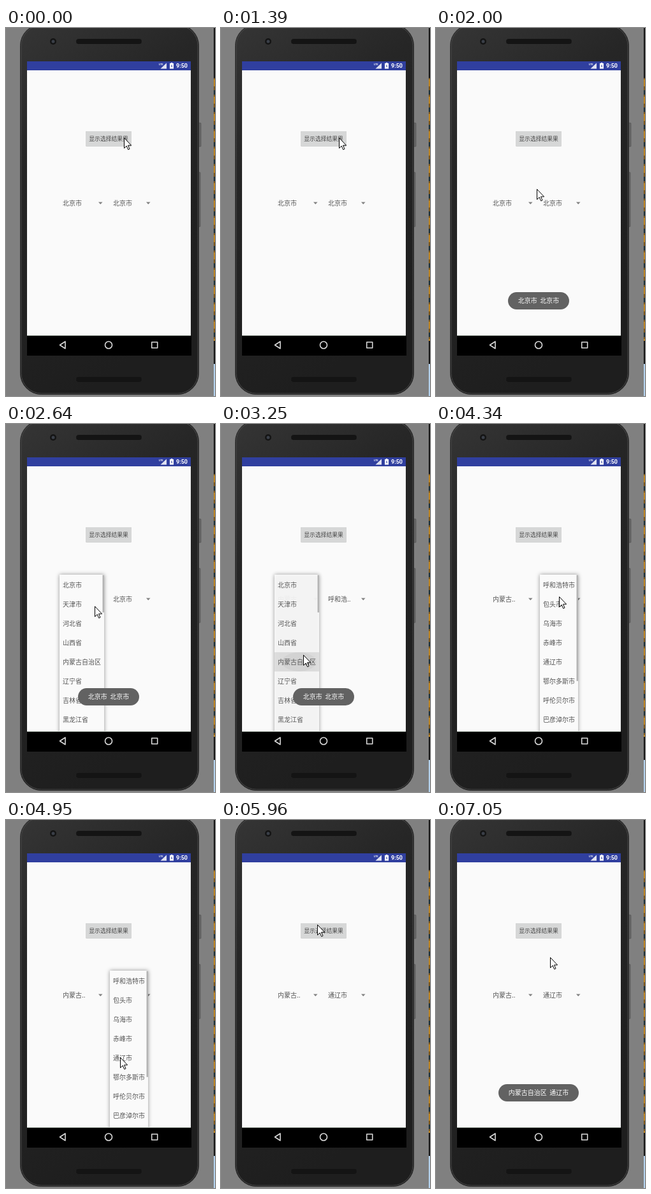
An HTML page that plays this animation: 328x574 px, repeating every 7.28 s.

```html
<!DOCTYPE html>
<html lang="zh-CN">
<head>
<meta charset="utf-8">
<title>Spinner demo</title>
<style>
  html, body { margin: 0; width: 100%; height: 100%; overflow: hidden; background: #808080; }
  svg { display: block; width: 328px; height: 574px; }
  text { font: 10px "Noto Sans CJK SC", "Noto Sans CJK", "Noto Sans", sans-serif; fill: #525252; white-space: pre; }
  .label { font-size: 8.8px; fill: #484848; }
  .clock { font: 700 9px Roboto, sans-serif; fill: #fff; }
  .lte { font: 700 4px Roboto, sans-serif; fill: #fff; }
  .toast text { fill: #fff; text-anchor: middle; }
  .toast rect { fill: #626262; }
  .shadow { fill: #000; fill-opacity: .42; filter: blur(3px); }
  .button { filter: drop-shadow(0 .6px .6px rgba(0, 0, 0, .3)); }
  .nav { fill: none; stroke: #dadada; stroke-width: 1.6; stroke-linejoin: round; }
  .key { fill: #666; stroke: #444; stroke-width: .5; }
</style>
</head>
<body>
<svg viewBox="0 0 328 574">
  <defs>
    <pattern id="mesh" width="2" height="2" patternUnits="userSpaceOnUse">
      <rect width="2" height="2" fill="#101010"/>
      <rect width="1" height="1" fill="#202020"/>
    </pattern>
    <pattern id="strip" y="78" width="4" height="27" patternUnits="userSpaceOnUse">
      <rect width="4" height="27" fill="#7a5418"/>
      <rect y="2" width="4" height="11" fill="#bd8420"/>
      <rect y="19" width="4" height="7" fill="#1c3038"/>
    </pattern>
    <linearGradient id="body" x2=".35" y2="1">
      <stop offset="0" stop-color="#353535"/>
      <stop offset=".35" stop-color="#262626"/>
      <stop offset="1" stop-color="#1e1e1e"/>
    </linearGradient>
    <clipPath id="content"><rect x="33" y="66" width="257" height="413"/></clipPath>
  </defs>

  <rect width="328" height="574" fill="#808080"/>
  <rect x="326" width="2" height="524" fill="#161616"/>
  <rect x="326" y="78" width="2" height="410" fill="url(#strip)"/>
  <rect x="326" y="524" width="2" height="50" fill="#b4d2ee"/>

  <rect class="key" x="302" y="148" width="4" height="37" rx="1"/>
  <rect class="key" x="302" y="225" width="3" height="85" rx="1"/>
  <rect x="22.5" y="-5.5" width="280" height="577" rx="33" fill="url(#body)" stroke="#2a2a2a"/>
  <rect x="24" y="-4" width="277" height="574" rx="31.5" fill="none" stroke="#464646"/>
  <circle cx="74" cy="21" r="5" fill="#141414"/>
  <circle cx="74" cy="21" r="2.5" fill="#3a3f48"/>
  <rect x="110" y="17" width="103" height="8" rx="4" fill="url(#mesh)"/>
  <rect x="110" y="544" width="103" height="8" rx="4" fill="url(#mesh)"/>

  <rect x="33" y="52" width="257" height="14" fill="#303f9f"/>
  <text class="lte" x="240" y="58">LTE</text>
  <path d="M242.5 63.5 252 54.5V63.500Z" fill="#fff" fill-opacity=".85"/>
  <path d="M258.800 54H261.200V55H263V63.500H257V55H258.800Z" fill="#fff"/>
  <path d="M260.600 56.500 258.700 59.800H260L259.500 62 261.400 58.900H260.200Z" fill="#303f9f"/>
  <text class="clock" x="267" y="62.400">9:50</text>

  <rect x="33" y="66" width="257" height="413" fill="#fafafa"/>
  <rect x="33" y="479" width="257" height="1" fill="#cfd8cf"/>
  <rect x="33" y="480" width="258" height="31" fill="#000"/>
  <g class="nav">
    <path d="M93 489V500L84.500 494.500Z"/>
    <circle cx="161" cy="494.500" r="5.500"/>
    <rect x="228.700" y="490" width="9" height="9"/>
  </g>

  <g clip-path="url(#content)">
    <rect class="button" x="125" y="161" width="72" height="23.500" rx="1.500" fill="#d6d7d7"/>
    <text class="label" x="130.300" y="175.800">显示选择结果果</text>
    <text id="province" x="89" y="276.800"></text>
    <text id="city" x="168" y="276.800"></text>
    <path id="arrow" d="M145 271.500h6.500l-3.250 3.500z" fill="#808080"/>
    <use href="#arrow" x="75"/>
    <g id="popups"></g>
    <g id="toasts"></g>
  </g>
  <path id="cursor" d="M.5.500V16.500L4.200 13 6.700 18.700 9 17.700 6.500 12.100H11.600Z" fill="#fff" stroke="#000"/>
</svg>

<script>
const LOOP = 7280, ROW = 30, TOP = 235, VIEW = 244, EM = 10;
const $ = id => document.getElementById(id);
const clamp = v => Math.max(0, Math.min(1, v));

const start = { x: 185, y: 171 };
const moves = [
  { from: 1620, to: 2000, x: 158, y: 251 },
  { from: 2070, to: 2170, x: 140, y: 272 },
  { from: 2550, to: 2950, x: 129, y: 360 },
  { from: 3400, to: 3870, x: 193, y: 269 },
  { from: 4340, to: 4880, x: 179, y: 370 },
  { from: 5740, to: 5960, x: 151, y: 163 },
  { from: 6580, to: 7050, x: 179, y: 214 }
];

const popups = [
  { x: 84, show: 2440, hide: 3240, span: 160, total: 34,
    items: '北京市 天津市 河北省 山西省 内蒙古自治区 辽宁省 吉林省 黑龙江省' },
  { x: 163, show: 4160, hide: 5180, span: 160, total: 12,
    items: '呼和浩特市 包头市 乌海市 赤峰市 通辽市 鄂尔多斯市 呼伦贝尔市 巴彦淖尔市' }
];

const toasts = [
  { show: 1400, hide: 3480, span: 220, text: '北京市  北京市' },
  { show: 6370, hide: LOOP, span: 220, text: '内蒙古自治区  通辽市' }
];

function popupMarkup({ x, items, total }) {
  const names = items.split(' ');
  const w = EM * (Math.max(...names.map(s => s.length)) + 1);
  const bar = VIEW * VIEW / (ROW * total);
  const box = `x="${x}" y="${TOP}" width="${w}" height="270"`;
  const rows = names.map((s, i) =>
    `<text x="${x + 5}" y="${TOP + 19.6 + ROW * i}">${s}</text>`).join('');
  return `<g>
    <rect class="shadow" ${box}/>
    <g class="panel">
      <rect ${box} fill="#fafafa"/>
      <g class="press">
        <rect x="${x}" y="356" width="${w}" height="${ROW}" fill-opacity=".1"/>
        <ellipse cx="${x + w * .55}" cy="371" rx="27" ry="15" fill-opacity=".04"/>
      </g>
      ${rows}
      <rect x="${x + w - 2.5}" y="${TOP + .5}" width="2.5" height="${bar}" fill="#b4b4b4"/>
    </g>
  </g>`;
}

function toastMarkup({ text }) {
  const w = EM * text.replace(/ /g, '').length + 36;
  return `<g class="toast">
    <rect x="${161 - w / 2}" y="412" width="${w}" height="27" rx="13.5"/>
    <text x="161" y="429.3">${text}</text>
  </g>`;
}

$('popups').innerHTML = popups.map(popupMarkup).join('');
$('toasts').innerHTML = toasts.map(toastMarkup).join('');

function alpha({ show, hide, span }, t) {
  return clamp(Math.min((t - show) / span, 1 - (t - hide) / span));
}

function cursorAt(t) {
  return moves.reduce((p, m) => {
    const u = clamp((t - m.from) / (m.to - m.from));
    const ease = u * u * (3 - 2 * u);
    return { x: p.x + (m.x - p.x) * ease, y: p.y + (m.y - p.y) * ease };
  }, start);
}

function draw(t) {
  const { x, y } = cursorAt(t);
  $('cursor').setAttribute('transform', `translate(${Math.round(x)} ${Math.round(y)})`);

  const [first, second] = popups.map(p => t >= p.hide);
  $('province').textContent = first ? '内蒙古..' : '北京市';
  $('city').textContent = second ? '通辽市' : first ? '呼和浩..' : '北京市';

  popups.forEach((p, i) => {
    const el = $('popups').children[i];
    // Fading the layers separately lets the shadow show through the panel.
    for (const layer of el.children) layer.style.opacity = alpha(p, t);
    el.querySelector('.press').style.opacity = t >= p.hide ? 1 : 0;
  });
  toasts.forEach((n, i) => $('toasts').children[i].style.opacity = alpha(n, t));
}

const begin = performance.now();
function tick() {
  draw((performance.now() - begin) % LOOP);
  requestAnimationFrame(tick);
}
tick();
</script>
</body>
</html>
```
